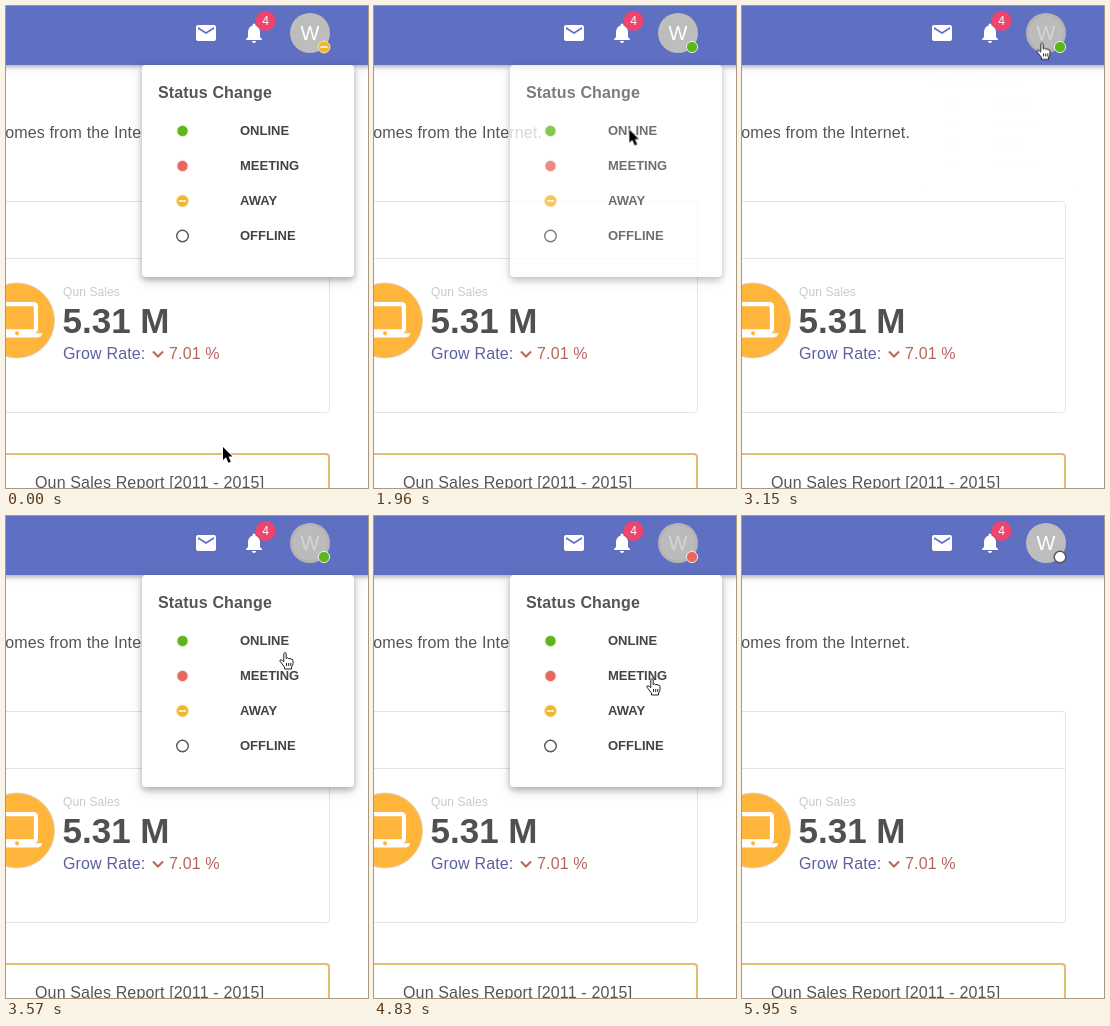
Recreate the animation shown at these times as an HTML page. Size 362x482 px, loop 6020 ms.

```html
<!DOCTYPE html>
<html lang="en">
<head>
<meta charset="utf-8">
<title>Status menu</title>
<style>
  html, body { margin: 0; width: 100%; height: 100%; overflow: hidden; background: #fff; }
  svg { display: block; }
  text { font: 16px "Liberation Sans", Arial, sans-serif; letter-spacing: .15px; fill: #555; }
  .bar { fill: #5f6fc1; filter: drop-shadow(0 2px 2px rgba(0,0,0,.22)) drop-shadow(0 1px 4px rgba(0,0,0,.14)); }
  .line { fill: none; stroke: #e4e4e4; }
  .caption { font-size: 12px; letter-spacing: .1px; fill: #c9c9c9; }
  .figure { font-size: 35px; font-weight: bold; letter-spacing: 0; fill: #505050; }
  .paper { fill: #fff; filter: drop-shadow(0 3px 3px rgba(0,0,0,.24)) drop-shadow(0 3px 6px rgba(0,0,0,.14)); }
  .title { font-weight: bold; }
  .items text { font-size: 13px; font-weight: bold; letter-spacing: 0; fill: #444; }

  .menu, .menu-fade, .cursor, .arrow, .hand, .strip, .ripple {
    animation: 6020ms infinite;
  }
  .menu, .menu-fade { animation-timing-function: cubic-bezier(.4, 0, .2, 1); }
  .menu { animation-name: grow; transform-origin: 304px 59px; }
  .menu-fade { animation-name: fade; }
  .cursor { animation-name: travel; animation-timing-function: ease-in-out; }
  .arrow, .hand, .strip, .ripple { animation-timing-function: step-end; }
  .arrow { animation-name: arrow; }
  .hand { animation-name: hand; }
  .strip { animation-name: status; }
  .ripple { animation-name: ripple; }

  @keyframes grow {
    0%, 32.97%, 55.15%, 67.28%, 78.57%, 91.11% { transform: none; }
    36.13%, 51.99%, 70.44%, 75.42%, 94.27%, 100% { transform: scale(.75, .5625); }
  }
  @keyframes fade {
    0%, 31.4%, 56.73%, 65.7%, 80.15%, 89.53% { opacity: 1; }
    36.13%, 51.99%, 70.44%, 75.42%, 94.27%, 100% { opacity: 0; }
  }
  @keyframes travel {
    0% { transform: translate(217px, 441px); }
    10.47% { transform: translate(250px, 139px); }
    12.79%, 17.44% { transform: translate(247px, 124px); }
    19.77%, 22.09% { transform: translate(246px, 120px); }
    31.4% { transform: translate(255px, 124px); }
    40.7% { transform: translate(265px, 112px); }
    52% { transform: translate(300px, 36px); }
    59.3% { transform: translate(279px, 136px); }
    65.7% { transform: translate(279px, 160px); }
    68.6% { transform: translate(302px, 66px); }
    75.42% { transform: translate(304px, 36px); }
    80.23% { transform: translate(278px, 162px); }
    89.53% { transform: translate(276px, 230px); }
    93% { transform: translate(272px, 250px); animation-timing-function: linear; }
    97.7% { transform: translate(222px, 462px); animation-timing-function: linear; }
    98.8%, 100% { transform: translate(215px, 490px); }
  }
  @keyframes arrow {
    0%, 32.5%, 66.3%, 90.5% { opacity: 1; }
    23.3%, 48.2%, 73.1% { opacity: 0; }
    100% { opacity: 1; }
  }
  @keyframes hand {
    0%, 32.5%, 66.3%, 90.5% { opacity: 0; }
    23.3%, 48.2%, 73.1% { opacity: 1; }
    100% { opacity: 0; }
  }
  @keyframes status {
    0% { transform: none; }
    31.4% { transform: translateY(-16px); }
    65.7% { transform: translateY(-32px); }
    89.53%, 100% { transform: translateY(-48px); }
  }
  @keyframes ripple {
    0%, 65.7%, 89.53%, 100% { opacity: 0; }
    52%, 75.42% { opacity: 1; }
  }
</style>
</head>
<body>
<svg width="362" height="482">
  <defs>
    <g id="away">
      <circle r="6" fill="#f1b52f" stroke="#f6e3b4"/>
      <path d="M-3.5 0h7" stroke="#fff" stroke-width="1.6"/>
    </g>
    <circle id="online" r="5.6" fill="#5fb61c" stroke="#e6f0de"/>
    <circle id="meeting" r="5.6" fill="#e9675c" stroke="#f6e4e2"/>
    <circle id="offline" r="5.8" fill="#fff" stroke="#555" stroke-width="1.4"/>
  </defs>

  <!-- page -->
  <text x="-9" y="132">comes from the Internet.</text>
  <rect class="line" x="-20" y="195.5" width="343.5" height="211" rx="3"/>
  <path class="line" d="M0 252.5H323"/>
  <circle cx="11" cy="314.5" r="37.5" fill="#ffb43c" stroke="#dcd3c3"/>
  <path transform="translate(-14 289.7) scale(2.09)" fill="#fff" d="M20 18c1.1 0 2-.9 2-2V5c0-1.1-.9-2-2-2H4c-1.1 0-2 .9-2 2v11c0 1.1.9 2 2 2H0c0 1.1.9 2 2 2h20c1.1 0 2-.9 2-2zM4 5h16v11H4zm8 14a1 1 0 1 1 0-2 1 1 0 0 1 0 2z"/>
  <text class="caption" x="57" y="290">Qun Sales</text>
  <text class="figure" x="56.5" y="327">5.31 M</text>
  <text x="57" y="353" style="fill:#5c609f">Grow Rate:</text>
  <path d="M147 345.5l5 5 5-5" fill="none" stroke="#bd6259" stroke-width="2"/>
  <text x="163" y="353" style="fill:#b5655b">7.01 %</text>
  <rect x="-20" y="448" width="343" height="60" rx="3" fill="none" stroke="#e3bd74" stroke-width="2"/>
  <text x="29" y="482">Qun Sales Report [2011 - 2015]</text>

  <!-- app bar -->
  <rect class="bar" x="-20" y="-20" width="402" height="79"/>
  <path transform="translate(188 15)" fill="#fff" d="M20 4H4c-1.1 0-2 .9-2 2v12c0 1.1.9 2 2 2h16c1.1 0 2-.9 2-2V6c0-1.1-.9-2-2-2zm0 4l-8 5-8-5V6l8 5 8-5z"/>
  <path transform="translate(236 15)" fill="#fff" d="M12 22c1.1 0 2-.9 2-2h-4c0 1.1.9 2 2 2zm6-6v-5c0-3.07-1.64-5.64-4.5-6.32V4a1.5 1.5 0 0 0-3 0v.68C7.63 5.36 6 7.92 6 11v5l-2 2v1h16v-1z"/>
  <circle cx="259.5" cy="15" r="10" fill="#ee446e"/>
  <text x="259.6" y="19.3" text-anchor="middle" style="font-size:12px;fill:#fff">4</text>
  <circle cx="304" cy="27" r="20" fill="#bdbdbd"/>
  <text x="304" y="34" text-anchor="middle" style="font-size:20px;fill:#fff">W</text>
  <g class="ripple">
    <circle cx="304" cy="27" r="20" fill="#a6a6a6" opacity=".4"/>
    <circle cx="304" cy="27" r="17.5" fill="#ccc" opacity=".35"/>
  </g>
  <svg x="310" y="33" width="16" height="16">
    <g class="strip">
      <use href="#away" x="8" y="8"/>
      <use href="#online" x="8" y="24"/>
      <use href="#meeting" x="8" y="40"/>
      <use href="#offline" x="8" y="56"/>
    </g>
  </svg>

  <!-- menu -->
  <g class="menu-fade">
    <g class="menu">
      <rect class="paper" x="136" y="59" width="212" height="212" rx="4"/>
      <text class="title" x="152" y="92">Status Change</text>
      <g class="items">
        <use href="#online" x="176.5" y="125"/><text x="234" y="129">ONLINE</text>
        <use href="#meeting" x="176.5" y="160"/><text x="234" y="164">MEETING</text>
        <use href="#away" x="176.5" y="195"/><text x="234" y="199">AWAY</text>
        <use href="#offline" x="176.5" y="230"/><text x="234" y="234">OFFLINE</text>
      </g>
    </g>
  </g>

  <!-- pointer -->
  <g class="cursor" stroke-linejoin="round">
    <path class="arrow" d="M0 0v13l3-2.7 2.4 5.4 2.4-1-2.3-5.2H9.5z" fill="#000" stroke="#fff" stroke-width="1.6" paint-order="stroke"/>
    <path class="hand" d="M-1.2 1.5q1.2-2 2.4 0v5q1.5-1.4 2.5.2 1.5-.9 2.3.5 2-.5 2 1.5v3q0 2-1.5 3.3v2H-.5v-2l-4.7-6q.3-2.2 2.4-.8l1.6 1.6zM1.5 11v3M3.7 11v3M5.8 11v3" fill="#fff" stroke="#222"/>
  </g>
</svg>
</body>
</html>
```
